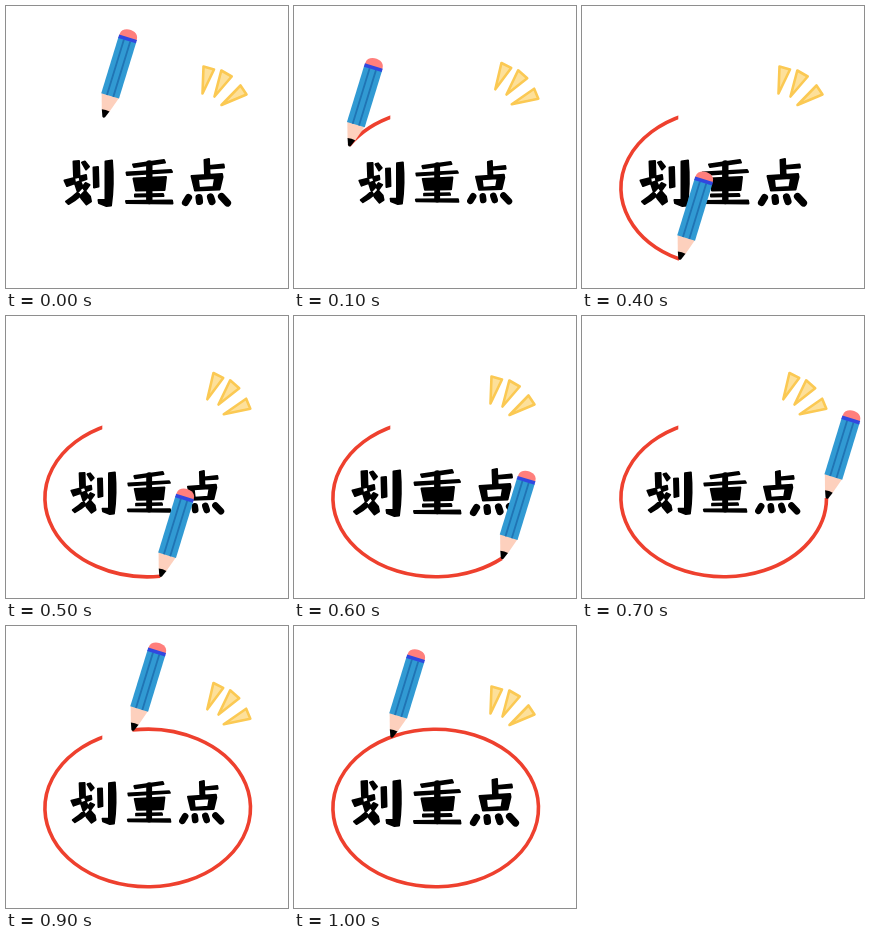
An HTML page with a canvas that plays this animation: 282 px wide and 282 px high, repeating every 1.4 s.

```html
<!DOCTYPE html>
<html lang="zh">
<head>
<meta charset="utf-8">
<title>划重点</title>
<style>
html, body { margin: 0; width: 100%; height: 100%; overflow: hidden; background: #fff; }
canvas { display: block; width: 282px; height: 282px; }
</style>
</head>
<body>
<canvas role="img" aria-label="划重点"></canvas>
<script>
const SIZE = 282, STEP = 100, LOOP = 1400, LAST = 10;
const canvas = document.querySelector('canvas');
const ctx = canvas.getContext('2d');
const dpr = window.devicePixelRatio || 1;
canvas.width = canvas.height = SIZE * dpr;

const oval = { x: 141.7, y: 182, rx: 102.8, ry: 78.8 };
// Position of the pencil tip on the oval, in degrees, for each step
const tipAngles = [244.4, 212.5, 180.6, 148, 115.6, 83, 50, 0, -49, -98.6, -115.6];

// Brush lettering: thin horizontals, heavy verticals
const brush = new Path2D([
  // 划
  'M58.5 174.5L80 169L80.5 173L61 180Z',
  'M67.5 155.5L73 155L73.5 171Q75 182 84 190.5L85 195.5L80.5 198.5Q69 187 68 170Z',
  'M76 156.5L79 155.5L83 160.5L80 163.5Z',
  'M79.5 177L83.5 179Q76 191 62.5 198L60 195.5Q73 187 79.5 177Z',
  'M87.5 161.5L92 161L92.5 180.5L88 181.5Z',
  'M99.5 155.5L106 154.5Q108 178 105 199.5L100.5 200L93 197L92.5 194L99.5 194Z',
  // 重
  'M127 158.5L158 154L159 156.5L128 161Z',
  'M120.5 166.5L165 164L166 166L121 169Z',
  'M127.5 172.5L160 171L158.5 184L130 184.5Z',
  'M147 174.5V176.5L154 176.2V174.2Z M147 179.7V181.7L153.5 181.4V179.4Z M134 175V177H140V174.7Z M134.5 180V182H140V179.7Z',
  'M129 188.5L157 188L157.5 190L129 190.5Z',
  'M120 195L166 194.5L166.5 197.5L120.5 197Z',
  // 点
  'M198.5 154L203 153L203.5 168H199Z',
  'M203 160L217.5 158.5L218 161.5L203 162.5Z',
  'M185.5 170L216 168L216.5 171L213.5 183.5L189 184.5Z M192 173L193 182L207.5 181L209 172Z'
].join(' '));
const trunk = new Path2D('M143.3 157.5V195');
const dots = new Path2D('M182.5 191.5L179.5 196.5 M193 191.5L193.5 195.5 M204.5 191L206 195.5 M215.5 190.5L221.5 197');

const rays = new Path2D('M197.5 60.5L208 63.5L196.5 87.5Z M215.3 64.5L225.7 70.5L208.5 90.5Z M234.5 79.5L240.5 88.5L215.5 99Z');

function fill(color, d) {
  ctx.fillStyle = color;
  ctx.fill(new Path2D(d));
}

function stroke(color, width, path) {
  ctx.strokeStyle = color;
  ctx.lineWidth = width;
  ctx.stroke(path);
}

function drawOval(step) {
  const line = new Path2D(), rad = Math.PI / 180;
  line.ellipse(oval.x, oval.y, oval.rx, oval.ry, 0, 247 * rad, tipAngles[step] * rad, true);
  ctx.lineCap = 'butt';
  stroke('#ee402e', 3.6, line);
  // The open end is cut off vertically
  if (step < LAST) {
    ctx.fillStyle = '#fff';
    ctx.fillRect(96.3, 100, 12, 18);
  }
}

function drawText(small) {
  ctx.save();
  ctx.translate(141.5, 177);
  if (small) ctx.scale(0.918, 0.918);
  ctx.translate(-141.5, -177);
  ctx.lineCap = ctx.lineJoin = 'round';
  ctx.fillStyle = '#000';
  ctx.fill(brush, 'evenodd');
  stroke('#000', 2, brush);
  stroke('#000', 6.4, trunk);
  stroke('#000', 7.2, dots);
  ctx.restore();
}

function drawRays(tilted) {
  ctx.save();
  if (tilted) {
    ctx.translate(209.5, 91);
    ctx.rotate(0.192);
    ctx.translate(-206, -93.5);
  }
  ctx.lineJoin = 'round';
  ctx.fillStyle = '#fde09a';
  ctx.fill(rays);
  stroke('#fbc953', 2.6, rays);
  ctx.restore();
}

// The pencil stands on its tip at (0, 0) before it is tilted
function drawPencil(step) {
  const a = tipAngles[step] * Math.PI / 180;
  ctx.save();
  ctx.translate(oval.x + oval.rx * Math.cos(a) + 0.4, oval.y + oval.ry * Math.sin(a));
  ctx.rotate(0.297);
  fill('#ff7f7c', 'M-9 -82V-84C-9 -93.5 9 -93.5 9 -84V-82Z');
  fill('#fdd0bd', 'M-9.2 -23H9.2L3.8 -6H-3.8Z');
  fill('#000', 'M-4 -6.8Q0 -7.8 4 -6.8L1.4 0Q0 1.5 -1.4 0Z');
  fill('#319ad3', 'M-9.3 -81H9.3V-22H-9.3Z');
  fill('#2074b4', 'M-4.2 -80H-2.4V-22H-4.2Z M2.4 -80H4.2V-22H2.4Z');
  fill('#3048e0', 'M-9.3 -83.4H9.3V-79.8H-9.3Z');
  ctx.restore();
}

function draw(now) {
  const step = Math.min(LAST, Math.floor(now % LOOP / STEP));
  const odd = step % 2;
  ctx.setTransform(dpr, 0, 0, dpr, 0, 0);
  ctx.fillStyle = '#fff';
  ctx.fillRect(0, 0, SIZE, SIZE);
  if (step > 0) drawOval(step);
  drawText(odd);
  drawRays(odd);
  drawPencil(step);
}

const start = performance.now();
function tick() {
  draw(performance.now() - start);
  requestAnimationFrame(tick);
}
tick();
</script>
</body>
</html>
```
